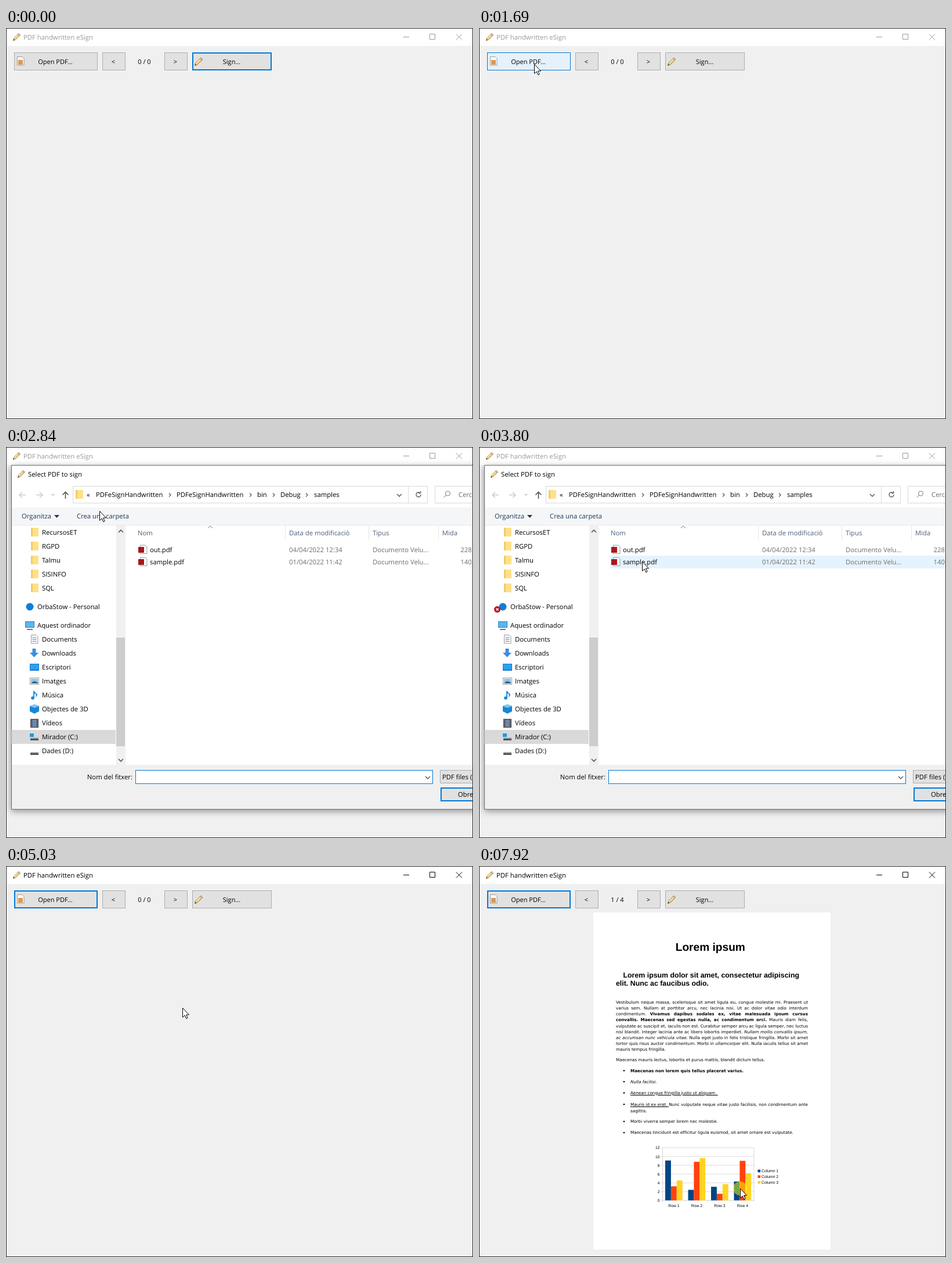
An HTML page for the animation above (7990 ms loop, 805 by 673 pixels).

```html
<!DOCTYPE html>
<html lang="ca">
<head>
<meta charset="utf-8">
<title>PDF handwritten eSign</title>
<style>
html, body { margin: 0; width: 805px; height: 673px; overflow: hidden; background: #f0f0f0 }
svg { display: block }
text, .line { text-rendering: geometricPrecision; white-space: pre }
text { font: 11.3px "Open Sans", "Noto Sans", sans-serif }
.btn text { font-size: 11px; text-anchor: middle }
.chart text { font: 6.8px "Liberation Sans", Arial, sans-serif }
.line { position: absolute; font: 7.21px/10px "DejaVu Sans", sans-serif; white-space: nowrap }
.head { font-family: "Liberation Sans", Arial, sans-serif; font-weight: bold }
</style>
</head>
<body>
<svg id="stage" width="805" height="673" viewBox="0 0 805 673"></svg>
<script>
const T = (x, y, s, o = '') => `<text x="${x}" y="${y}" ${o}>${s}</text>`;
const R = (x, y, w, h, fill, o = '') => `<rect x="${x}" y="${y}" width="${w}" height="${h}" fill="${fill}" ${o}/>`;
const box = (x, y, w, h, fill, stroke, o = '') => R(x + .5, y + .5, w - 1, h - 1, fill, `stroke="${stroke}" ${o}`);
const P = (d, stroke, o = '') => `<path d="${d}" stroke="${stroke}" fill="none" ${o}/>`;
const C = (x, y, r, fill, o = '') => `<circle cx="${x}" cy="${y}" r="${r}" fill="${fill}" ${o}/>`;
const G = (id, s) => `<g id="${id}">${s}</g>`;
const BLUE = '#0078d7';

const pencil = (x, y, s = 1) => `<g transform="translate(${x} ${y}) scale(${s})">
  <path d="M1 15L2.5 10.5 11 2 14 5 5.5 13.5Z" fill="#f6cd74" stroke="#93713a" stroke-width=".9"/>
  <path d="M3.5 11L11.5 3" stroke="#fff0c4" stroke-width="1.2"/>
  <path d="M9.8 3.2L11.5 1.5 14.5 4.5 12.8 6.2Z" fill="#e0b6a0" stroke="#8f8478" stroke-width=".8"/>
  <path d="M1 15L1.8 12.3 3.6 14.2Z" fill="#333"/></g>`;
const sheet = (x, y, s = '') => P(`M${x} ${y}h8.5l3 3v11.5h-11.5Z`, '#999', 'style="fill:#fff"') + s;
const folder = (x, y) => R(x, y, 13, 15, '#ffe08a') + R(x, y, 3, 15, '#f3cc62');
const chev = (x, y, c = '#555', w = 4, d = 4) => P(`M${x - w} ${y - d / 2}l${w} ${d}l${w} ${-d}`, c, 'stroke-width="1.4"');

// Main window
const button = (id, x, w, label, cx) => `<g class="btn" id="${id}">` +
  box(x, 42, w, 31, '#e1e1e1', '#adadad', 'class="face"') +
  box(x + 1, 43, w - 2, 29, 'none', BLUE, 'class="ring"') + T(cx, 62, label) + '</g>';

const mainWindow = R(0, 0, 805, 673, '#f0f0f0') + R(0, 0, 805, 31, '#fff') +
  pencil(11.5, 8, .9) +
  G('caption', T(30, 20, 'PDF handwritten eSign', 'fill="currentColor"') +
    P('M685 15.5h10M730.5 10.5h9v9h-9ZM776 10.5l10 10M786 10.5l-10 10', 'currentColor')) +
  button('open', 14, 144, 'Open PDF...', 85) +
  sheet(19.5, 49.5, R(21, 55, 8, 8, '#dc9a50')) +
  button('prev', 166, 40, '&lt;', 185) + button('next', 273, 40, '&gt;', 292) +
  `<g class="btn">${T(238.5, 62, '0 / 0', 'id="pages"')}</g>` +
  button('sign', 321, 137, 'Sign...', 389) + pencil(324.5, 49.5);

// Document page
const line = (x, base, s, w, o = '') =>
  `<div class="line" style="left:${x}px;top:${base - 7.5}px;${w ? `width:${w}px;text-align-last:justify;` : ''}${o}">${s}</div>`;
const heading = (x, base, size, s) =>
  T(x, base, s, `class="head" style="font-family:'Liberation Sans',Arial,sans-serif;font-size:${size}px"`);

const body = [
  'Vestibulum neque massa, scelerisque sit amet ligula eu, congue molestie mi. Praesent ut',
  'varius sem. Nullam at porttitor arcu, nec lacinia nisi. Ut ac dolor vitae odio interdum',
  'condimentum. <b>Vivamus dapibus sodales ex, vitae malesuada ipsum cursus</b>',
  '<b>convallis. Maecenas sed egestas nulla, ac condimentum orci.</b> Mauris diam felis,',
  'vulputate ac suscipit et, iaculis non est. Curabitur semper arcu ac ligula semper, nec luctus',
  'nisl blandit. Integer lacinia ante ac libero lobortis imperdiet. <i>Nullam mollis convallis ipsum,</i>',
  '<i>ac accumsan nunc vehicula vitae.</i> Nulla eget justo in felis tristique fringilla. Morbi sit amet',
  'tortor quis risus auctor condimentum. Morbi in ullamcorper elit. Nulla iaculis tellus sit amet',
  'mauris tempus fringilla.'];
const bullets = [
  [355, '<b>Maecenas non lorem quis tellus placerat varius.</b>'],
  [374, '<i>Nulla facilisi.</i>'],
  [393.3, '<u>Aenean congue fringilla justo ut aliquam.&nbsp;</u>'],
  [413, '<u>Mauris id ex erat. </u>Nunc vulputate neque vitae justo facilisis, non condimentum ante', 306],
  [442.5, 'Morbi viverra semper lorem nec molestie.'],
  [461.7, 'Maecenas tincidunt est efficitur ligula euismod, sit amet ornare est vulputate.']];

function chart() {
  const unit = 7.54, floor = 575.5, colors = ['#004586', '#ff420e', '#ffd320'];
  const rows = [[9.1, 3.2, 4.54], [2.4, 8.8, 9.65], [3.1, 1.5, 3.7], [4.3, 9.02, 6.2]];
  let s = '';
  for (let v = 0; v <= 12; v += 2) {
    const y = floor - v * unit;
    s += P(`M313.5 ${y}H474`, '#cfcfcf', 'stroke-width=".7"') + T(311.5, y + 2.4, v, 'text-anchor="end"');
  }
  s += P(`M316.5 485V578M474 485V578M355.9 575v3M395.2 575v3M434.6 575v3`, '#c4c4c4', 'stroke-width=".7"');
  rows.forEach((r, i) => {
    r.forEach((v, k) => s += R(321 + i * 39.5 + k * 9.9, floor - v * unit, 9.9, v * unit, colors[k]));
    s += T(336 + i * 39.5, 586.5, 'Row ' + (i + 1), 'text-anchor="middle"');
  });
  colors.forEach((c, k) => s += R(480.5, 522.6 + k * 9.8, 4.6, 4.6, c) + T(487, 527.3 + k * 9.8, 'Column ' + (k + 1)));
  return `<g class="chart">${s}</g>`;
}

const page = G('page', R(197, 80, 409, 580, '#fff') +
  heading(338.7, 146, 19.15, 'Lorem ipsum') +
  heading(248.5, 192, 12.36, 'Lorem ipsum dolor sit amet, consectetur adipiscing') +
  heading(236, 206, 12.36, 'elit. Nunc ac faucibus odio.') +
  '<foreignObject width="805" height="673"><div xmlns="http://www.w3.org/1999/xhtml">' +
  body.map((s, i) => line(236, 237.6 + i * 10.1, s, i < 8 && 331)).join('') +
  line(236, 336.5, 'Maecenas mauris lectus, lobortis et purus mattis, blandit dictum tellus.') +
  bullets.map(([y, s, w]) => line(261, y, s, w)).join('') + line(261, 424, 'sagittis.') +
  '</div></foreignObject>' + bullets.map(([y]) => C(250, y - 2.7, 1.3, '#000')).join('') + chart());

// File dialog
const tree = [['RecursosET', 147], ['RGPD', 171], ['Talmu', 195], ['SISINFO', 219], ['SQL', 243],
  ['OrbaStow - Personal', 275, 54], ['Aquest ordinador', 307, 54], ['Documents', 331], ['Downloads', 355],
  ['Escriptori', 379], ['Imatges', 403], ['Música', 427], ['Objectes de 3D', 451], ['Vídeos', 475],
  ['Mirador (C:)', 499], ['Dades (D:)', 523]];
const files = [['out.pdf', '04/04/2022 12:34', 228, 177], ['sample.pdf', '01/04/2022 11:42', 140, 198]];
const drive = y => R(42, y, 14, 3, '#a9adb1') + R(42, y + 2, 14, 3, '#4d5358');
const grey = 'fill="#6d6d6d"', slate = 'fill="#4c607a"', navy = 'fill="#1e395b"';

const fixedIcons = [147, 171, 195, 219, 243].map(y => folder(43, y - 8)).join('') +
  C(41, 275, 6.5, '#0f7fd6') +
  R(33, 300, 16, 11, '#2f7fbd') + R(34, 301, 14, 9, '#5bb5ee') + R(36, 313, 10, 2, '#5d7890') +
  sheet(43.5, 323.5, P('M45.5 328.5h7M45.5 331.5h7M45.5 334.5h7', '#3c8ad0')) +
  '<path d="M45.5 347h6v7h4.5L48.5 362 41 354h4.5Z" fill="#3b8fe0"/>' +
  drive(500) + R(41, 493, 7, 6, '#1b9de2');
const lateIcons = R(41, 373, 16, 12, '#1479d1') + R(42, 374, 14, 9, '#2ba1f1') +
  box(41, 397, 16, 12, '#fff', '#999') + R(43, 399, 12, 8, '#8cc4ee') + '<path d="M43 407l5-4 7 2v2Z" fill="#3d627d"/>' +
  C(46, 432, 2.8, '#1687dc') + P('M48 432V420q1 4 5 5.500q0 2-1.500 4', '#1687dc', 'stroke-width="1.800"') +
  '<path d="M41 446l8-3 8 3v9l-8 4-8-4Z" fill="#1687d9"/><path d="M41 446l8-3 8 3-8 3Z" fill="#7cc8f5"/>' +
  R(42, 468, 14, 15, '#343840') + R(45, 469, 8, 13, '#6d86a5') +
  P('M43.5 469v13M54.500 469v13', '#ddd', 'stroke-dasharray="1.500 1.500"') + drive(525);

const dialog = G('dialog',
  box(9, 31, 962, 593, '#fff', '#6e6e6e', 'style="filter:drop-shadow(0 3px 6px #0006)"') +
  pencil(19.5, 39, .9) + T(38, 51, 'Select PDF to sign') +
  P('M34 82.500H23M28 77.500l-5 5 5 5M52 82.500h11M58 77.500l5 5-5 5', '#c9c9c9', 'stroke-width="1.300"') +
  chev(81, 82, '#c4c4c4', 2.5, 2.5) + P('M102.500 89V77.500M97.500 82.500l5-5 5 5', '#555', 'stroke-width="1.600"') +
  box(115, 67, 612, 30, '#fff', '#d9d9d9') + P('M693.5 67v30', '#d9d9d9') + folder(120, 74) +
  T(139, 86, '«') + [[155, 'PDFeSignHandwritten'], [294, 'PDFeSignHandwritten'], [433, 'bin'], [473, 'Debug'], [531, 'samples']]
    .map(([x, s]) => T(x, 86, s)).join('') +
  [282, 421, 461, 518].map(x => P(`M${x - 1} 79.500l3 3-3 3`, '#555', 'stroke-width="1.200"')).join('') +
  chev(678, 83) + P('M715 82a4 4 0 1 1-2-3.500M714.500 76v3.500h-3.500', '#666', 'stroke-width="1.500"') +
  box(739, 67, 220, 30, '#fff', '#d9d9d9') + C(761.5, 80, 4, 'none', 'stroke="#777"') + P('M758.500 83l-4 4', '#777') +
  T(780, 86, 'Cercar', grey) +
  R(10, 104, 960, 31, '#f5f6f7') + P('M10 134.5H970', '#e8e9ea') +
  T(27, 123, 'Organitza', navy) + '<path d="M83 117h9l-4.500 5Z" fill="#1e395b"/>' + T(122, 123, 'Crea una carpeta', navy) +
  R(190, 135, 16, 412, '#f0f0f0') + R(190, 328, 15, 187, '#cdcdcd') +
  P('M194 147l4-4 4 4M194 537l4 4 4-4', '#555', 'stroke-width="1.600"') +
  R(9.5, 487, 179.5, 24, '#d9d9d9') + tree.map(([s, y, x = 62]) => T(x, y + 4, s)).join('') + fixedIcons +
  G('blank', sheet(43.5, 515.5) + files.map(f => sheet(230.5, f[3] - 8)).join('')) +
  P('M481.500 135v25M625.500 135v25M745.500 135v25', '#e5e5e5') + P('M348 139.500l4-3.500 4 3.500', '#777') +
  [[227, 'Nom'], [488, 'Data de modificació'], [632, 'Tipus'], [752, 'Mida']].map(([x, s]) => T(x, 152, s, slate)).join('') +
  files.map(([name, date, size, y], i) => R(226, y - 11, 600, 22, '#e5f3ff', `id="row${i}"`) +
    T(248, y + 4, name) + T(488, y + 4, date, grey) + T(632, y + 4, 'Documento Velu...', grey) +
    T(783.5, y + 4, size + ' KB', grey)).join('') +
  G('icons', lateIcons + files.map(f => sheet(231.5, f[3] - 8) + R(228, f[3] - 5, 10, 10, '#a8181c')).join('')) +
  G('badge', C(31.5, 279.5, 5.5, '#c50f1f') + P('M29.500 277.500l4 4M33.500 277.500l-4 4', '#fff', 'stroke-width="1.300"')) +
  R(10, 547, 960, 76, '#f0f0f0') + T(218, 572, 'Nom del fitxer:', 'text-anchor="end"') +
  box(223, 556, 513, 24, '#fff', BLUE) + chev(727, 569) +
  T(228, 572, 'sample.pdf', 'id="name"') + R(228, 560, 1, 16, '#000', 'id="caret"') +
  box(748, 556, 200, 23, '#e1e1e1', '#adadad') + T(752, 572, 'PDF files (*.pdf)') +
  R(750, 587, 104, 22, '#e1e1e1', `stroke="${BLUE}" stroke-width="2"`) + T(779, 602, 'Obre'));

const pointer = G('pointer', C(0, 0, 12, '#ff0', 'id="click" fill-opacity=".5"') +
  '<path d="M.5 .5V16.500L4.200 13 6.800 18.700 9.200 17.600 6.600 12H11.500Z" fill="#fff" stroke="#000"/>');

document.getElementById('stage').innerHTML = mainWindow + page + dialog + pointer +
  box(0, 0, 805, 673, 'none', '#2b2b2b');

// Motion
const $ = id => document.getElementById(id);
const show = (id, on) => $(id).style.display = on ? '' : 'none';
const within = (t, a, b) => t >= a && t < b;
const path = [[680, 660, 441], [1210, 95, 62], [2500, 95, 62], [3300, 281, 197], [4500, 281, 197], [4610, 282, 232],
  [4830, 282, 232], [5010, 304, 244], [6120, 304, 244], [6480, 555, 603], [6610, 555, 603], [6740, 553, 612],
  [6930, 529, 596], [7640, 450, 555], [7990, 450, 555]];

function position(t) {
  const i = Math.max(1, path.findIndex(k => k[0] > t));
  const [a, b] = [path[i - 1], path[i]];
  let u = Math.max(0, (t - a[0]) / (b[0] - a[0]));
  u = u * u * (3 - 2 * u);
  return [a[1] + (b[1] - a[1]) * u, a[2] + (b[2] - a[2]) * u];
}

function setButton(id, fill, stroke, ring) {
  const face = $(id).querySelector('.face');
  face.setAttribute('fill', fill);
  face.setAttribute('stroke', stroke);
  $(id).querySelector('.ring').style.display = ring ? '' : 'none';
}

function draw(t) {
  const step = Math.floor((t - 15) / 66.67) * 66.67 + 20;
  const [x, y] = position(step).map(Math.round);

  show('pointer', t >= 720);
  $('pointer').setAttribute('transform', `translate(${x} ${y})`);
  show('click', [[1420, 1550], [3870, 3935], [4000, 4070], [7920, 7990]].some(([a, b]) => within(t, a, b)));

  const active = within(t, 1420, 1690) || t >= 4150;
  $('caption').style.color = active ? '#000' : '#999';
  if (within(t, 1420, 1550)) setButton('open', '#cce4f7', '#005499', false);
  else if (within(t, 1220, 3500)) setButton('open', '#e5f1fb', BLUE, false);
  else setButton('open', '#e1e1e1', t >= 3500 ? BLUE : '#adadad', t >= 3500);
  setButton('sign', '#e1e1e1', t < 1420 ? BLUE : '#adadad', t < 1420);
  setButton('prev', '#e1e1e1', '#adadad', false);
  setButton('next', '#e1e1e1', '#adadad', false);

  show('page', t >= 5630);
  $('pages').textContent = t >= 5630 ? '1 / 4' : '0 / 0';

  const opened = within(t, 2020, 4220);
  show('dialog', opened);
  if (!opened) return;
  const u = Math.min(1, Math.max(0, (step - 1960) / 325));
  const o = step < 4000 ? 1 - (1 - u) ** 2.3 : Math.max(0, 1 - (step - 4000) / 230);
  const s = .93 + .07 * o;
  $('dialog').setAttribute('opacity', o);
  $('dialog').setAttribute('transform', `translate(${490 * (1 - s)} ${327 * (1 - s)}) scale(${s})`);
  const loaded = t >= 2550, chosen = t >= 3870;
  show('icons', loaded);
  show('blank', !loaded);
  show('badge', t >= 3400);
  show('name', chosen);
  show('caret', t < 2750 || within(t, 3280, 3800));
  files.forEach((f, i) => show('row' + i, x > 226 && Math.abs(y - f[3]) < 11));
  $('row1').setAttribute('fill', chosen ? '#cce8ff' : '#e5f3ff');
}

const start = performance.now();
(function tick() {
  draw((performance.now() - start) % 7990);
  requestAnimationFrame(tick);
})();
</script>
</body>
</html>
```
